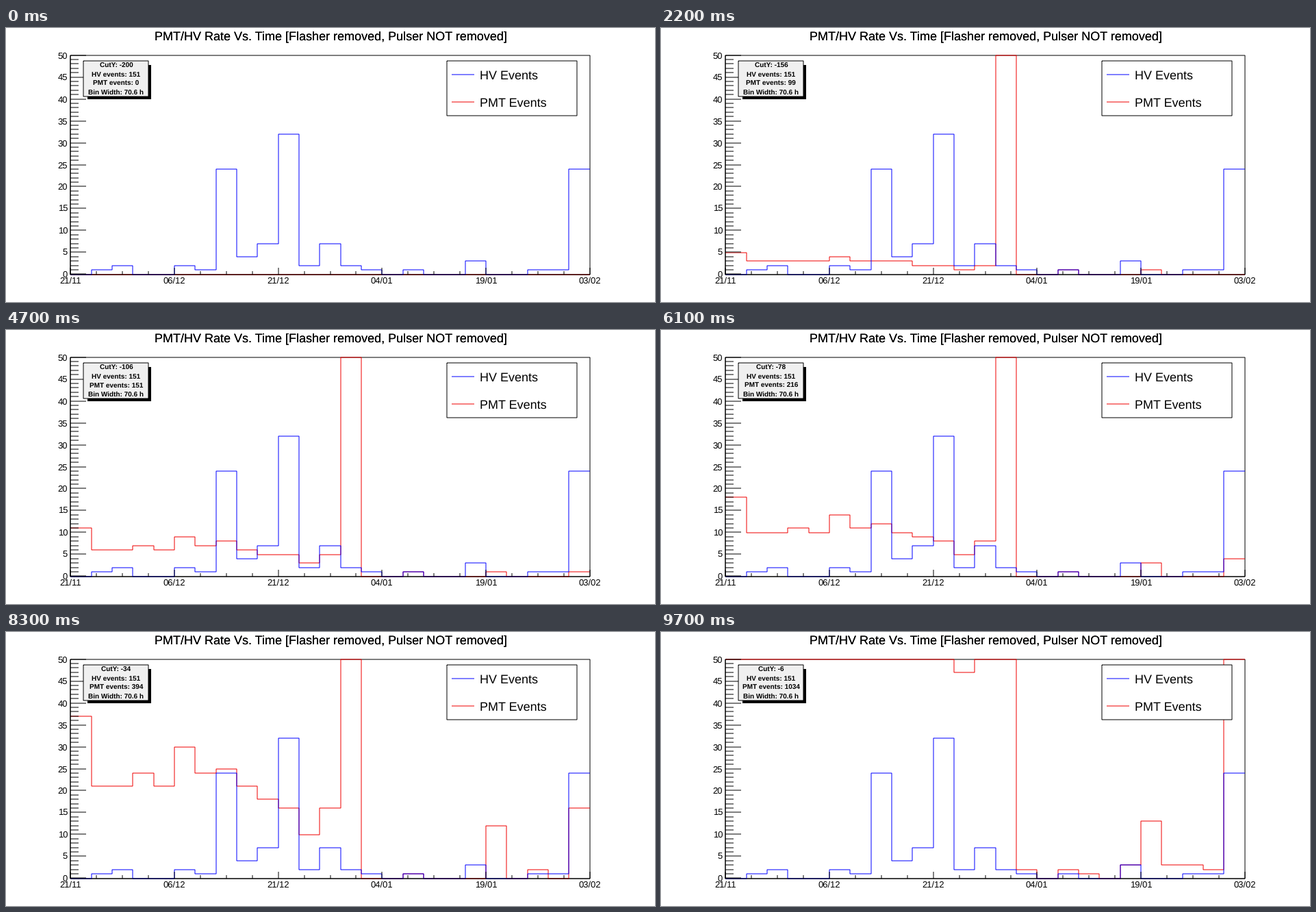
Animation of 948 by 400 pixels, one loop 9.8 s. Source, as a matplotlib script:

```python
import math

import matplotlib.pyplot as plt
import numpy as np
from matplotlib.animation import FuncAnimation
from matplotlib.patches import Rectangle

W, H, DPI = 948, 400, 128
PX = 72 / DPI                      # one pixel in points
FRAMES, STEP_MS = 98, 100
LEFT, RIGHT, TOP, BOTTOM = 94, 853, 40, 360
BINS, Y_MAX = 25, 50
BLUE, RED = "blue", "#f00000"

plt.rcParams["font.family"] = "Liberation Sans"
plt.rcParams["text.hinting"] = "none"

# Non-empty HV bins
HV = {1: 1, 2: 2, 5: 2, 6: 1, 7: 24, 8: 4, 9: 7, 10: 32, 11: 2, 12: 7,
      13: 2, 14: 1, 16: 1, 19: 3, 22: 1, 23: 1, 24: 24}

# Relative strength of the PMT bins that share one exponential growth
STRENGTH = (25, 14, 14, 16, 14, 20, 16, 17, 14, 12, 11, 7, 11)
SPIKE = 13
# Noise that only shows once the cut is nearly gone
LATE = {14: 2, 16: 1, 17: 1, 19: 3, 21: 3, 22: 1, 23: 2}
# (frame, value) points of single bins and of the total
POINTS = {16: ((5, 0), (6, 1)),
          20: ((0, 0), (8, 1), (40, 1), (60, 2), (71, 11), (97, 13)),
          22: ((71, 0), (78, 2))}
TOTAL = ((0, 0), (10, 62), (22, 99), (47, 151), (61, 216), (71, 284),
         (83, 394), (90, 560), (97, 1034))


def along(points, frame):
    return np.interp(frame, *zip(*points))


def pmt_counts(frame):
    """All PMT bins; the spike takes what is left of the total."""
    growth = math.exp((frame - 71) / 30) * min(frame / 20, 1)
    late = max(0, (frame - 83) / 14) ** 2.6
    values = np.zeros(BINS)
    values[:SPIKE] = np.array(STRENGTH) * growth + 30 * late
    values[24] = 8 * (frame / 71) ** 4.5 + 30 * late
    for b, points in POINTS.items():
        values[b] = along(points, frame)
    for b, n in LATE.items():
        values[b] += n * late
    counts = np.floor(values + 0.5).astype(int)
    total = int(along(TOTAL, frame))
    counts[SPIKE] = max(0, total - counts.sum())
    return counts, total


def y_pix(v):
    return int(BOTTOM - 6.4 * min(v, Y_MAX) + 1e-6)


def y_tick(v):
    """Axis ticks truncate a slightly smaller value than the bars."""
    return int(BOTTOM - 0.0023 - 6.3999 * v)


EDGES = [int(94.8 + 30.336 * k) for k in range(BINS + 1)]
STEP_X = np.repeat(EDGES, 2)[1:-1]


def step_y(values):
    return np.repeat([y_pix(v) for v in values], 2)


fig = plt.figure(figsize=(W / DPI, H / DPI), dpi=DPI, facecolor="white")
ax = fig.add_axes([0, 0, 1, 1])
ax.set_xlim(0, W)
ax.set_ylim(H, 0)
ax.axis("off")


def line(xs, ys, color="black", z=1):
    return ax.plot(xs, ys, color=color, lw=PX, zorder=z, snap=False,
                   solid_capstyle="butt", solid_joinstyle="miter")[0]


def outline(x0, y0, x1, y1, z):
    line([x0, x1, x1, x0, x0], [y0, y0, y1, y1, y0], z=z)


def fill(x0, y0, x1, y1, color, z):
    ax.add_patch(Rectangle((x0, y0), x1 - x0, y1 - y0, fc=color, ec="none",
                           lw=0, zorder=z))


def text(x, y, s, size, ha="center", weight="normal"):
    return ax.text(x, y, s, fontsize=size * PX, ha=ha, va="baseline",
                   weight=weight, color="black", zorder=8)


# Frame, then the axes, which lie over the histograms
outline(LEFT, TOP, RIGHT, BOTTOM, z=1)
line([LEFT, LEFT], [TOP, BOTTOM], z=4.5)
line([LEFT, RIGHT], [BOTTOM, BOTTOM], z=4.5)
for v in range(Y_MAX + 1):
    major = v % 5 == 0
    y = y_tick(v)
    line([LEFT, 117 if major else 106], [y, y], z=4.5)
    if major:
        text(90, y + 5, str(v), 13, ha="right")

DATES = ("21/11", "06/12", "21/12", "04/01", "19/01", "03/02")
for k in range(21):
    x = int(94.8 + 37.92 * k)
    line([x, x], [355 if k % 4 else 350, BOTTOM], z=4.5)
    if k % 4 == 0:
        text(x, 373, DATES[k // 4], 13)

# The title is painted twice, which makes it heavier
for _ in range(2):
    text(474.5, 17, "PMT/HV Rate Vs. Time [Flasher removed, Pulser NOT removed]",
         18)

# Histograms
pmt_line = line(STEP_X, step_y([0] * BINS), RED, 3)
line(STEP_X, step_y([HV.get(b, 0) for b in range(BINS)]), BLUE, 4)

# Legend
fill(644, 48, 834, 128, "white", 5)
outline(644, 48, 834, 128, z=5.1)
for y, color, name in ((68, BLUE, "HV Events"), (108, RED, "PMT Events")):
    line([651, 684], [y, y], color, 6)
    text(692, y + 7, name, 18, ha="left")

# Info box with shadow
fill(119, 54, 212, 104, "black", 5)
fill(113, 48, 208, 100, "#f0f0f0", 6)
outline(113, 48, 208, 100, z=6.1)
info = [text(160.9, 58 + 13 * i, s, 10, weight="bold") for i, s in
        enumerate(("", "HV events: 151", "", "Bin Width: 70.6 h"))]


def draw(frame):
    counts, total = pmt_counts(frame)
    pmt_line.set_ydata(step_y(counts))
    info[0].set_text(f"CutY: {2 * frame - 200}")
    info[2].set_text(f"PMT events: {total}")
    return pmt_line, info[0], info[2]


anim = FuncAnimation(fig, draw, frames=FRAMES, interval=STEP_MS,
                     repeat=True, repeat_delay=0)
plt.show()
```
